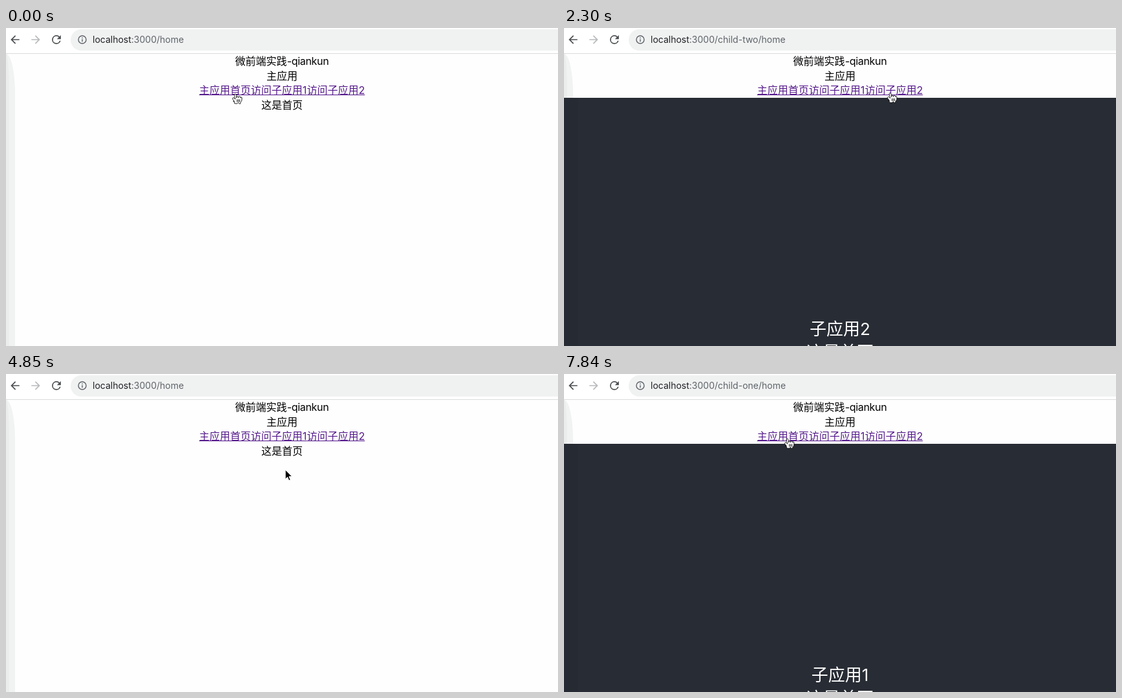
These frames come from a looping animation (854 px wide and 492 px high, 7.99 s). An HTML page:

```html
<!DOCTYPE html>
<html lang="zh-CN">
<head>
<meta charset="utf-8">
<style>
html, body { margin: 0; width: 100%; height: 100%; overflow: hidden; background: #fefefe; }
body { position: relative; font: 16px/22.5px Inter, "Noto Sans CJK SC", "Noto Sans CJK", sans-serif; color: #000; }
body > * { position: absolute; }
#edge { left: 0; top: 40px; width: 14px; height: 452px; overflow: hidden; background: #f1f2f2; border-top-right-radius: 14px 62px; }
#edge::before { content: ""; position: absolute; width: 5px; height: 100%; background: #ebecec; border-top-right-radius: 5px 60px; }
#bar { left: 0; top: 0; width: 100%; height: 39px; background: #fff; border-bottom: 1px solid #dadcdc; }
#pill { left: 100px; top: 2px; width: 780px; height: 33px; border-radius: 17px; background: #f0f2f2; }
#url { left: 134px; top: 7px; font-size: 14px; white-space: pre; color: #5f6368; }
#url b { font-weight: 400; color: #202124; }
#main { left: 0; top: 40px; width: 100%; text-align: center; }
#main span { letter-spacing: -.3px; }
a { color: #551a8b; text-decoration: underline 1px; text-underline-offset: 1px; }
a.active { color: #f00; }
#child { left: 0; top: 107.5px; width: 100%; height: 385px; background: linear-gradient(90deg, #262a32 22px, #282c34 22px); overflow: hidden; color: #fff; font-size: 26px; line-height: 36.4px; text-align: center; }
#child div { margin-top: 340.5px; }
svg { left: 0; top: 0; width: 854px; height: 492px; }
</style>
</head>
<body>
<div id="edge"></div>
<div id="bar"></div>
<div id="pill"></div>
<div id="url"><b>localhost</b>:3000<span id="path"></span></div>
<div id="main">
  <div>微前端实践<span>-qiankun</span></div>
  <div>主应用</div>
  <div><a>主应用首页</a><a>访问子应用1</a><a>访问子应用2</a></div>
  <div>这是首页</div>
</div>
<div id="child"><div id="name"></div>这是首页</div>
<svg viewBox="0 0 854 492">
  <defs><path id="back" d="M20 11H7.83l5.59-5.59L12 4l-8 8 8 8 1.41-1.41L7.83 13H20z"/></defs>
  <use href="#back" fill="#4d5053" transform="translate(14 18) scale(.84) translate(-12 -12)"/>
  <use href="#back" fill="#b9bbbd" transform="translate(46 18) scale(-.84 .84) translate(-12 -12)"/>
  <path fill="#4d5053" transform="translate(78 18) scale(.86) translate(-12 -12)" d="M17.65 6.35A7.96 7.96 0 0 0 12 4a8 8 0 1 0 7.73 10h-2.08A6 6 0 1 1 12 6c1.66 0 3.14.69 4.22 1.78L13 11h7V4z"/>
  <g fill="none" stroke="#5f6368" stroke-width="1.4">
    <circle cx="118" cy="18" r="6"/>
    <path d="M118 17.2v4M118 14.4v1.5"/>
  </g>
  <g id="cursor">
    <path id="arrow" d="M0 0V14.5L3.4 11.4 5.6 16.6 8 15.6 5.8 10.5H10.4Z" stroke="#fff"/>
    <g id="hand" transform="translate(-13 -8)" stroke="#000" stroke-width=".9" stroke-linejoin="round" stroke-linecap="round">
      <path fill="#fff" d="m11.3 20.4c-.3-.4-.6-1.1-1.2-2-.3-.5-1.2-1.5-1.5-1.9-.2-.4-.2-.6-.1-1 .1-.6.7-1.1 1.4-1.1.5 0 1 .4 1.4.7.2.2.5.6.7.8.2.2.2.3.4.5.2.3.3.5.2.1-.1-.5-.2-1.3-.4-2.1-.1-.6-.2-.7-.3-1.1-.1-.5-.2-.8-.3-1.3-.1-.3-.2-1.1-.3-1.5-.1-.5-.1-1.4.3-1.8.3-.3.9-.4 1.3-.2.5.3.8 1 .9 1.3.2.5.4 1.2.5 2 .2 1 .5 2.5.5 2.8 0-.4-.1-1.1 0-1.5.1-.3.3-.7.7-.8.3-.1.6-.1.9-.1.3.1.6.3.8.5.4.6.4 1.9.4 1.8.1-.4.1-1.2.3-1.6.1-.2.5-.4.7-.5.3-.1.7-.1 1 0 .2 0 .6.3.7.5.2.3.3 1.3.4 1.7 0 .1.1-.4.3-.7.4-.6 1.8-.8 1.9.6v2.7c0 .5-.1 1-.2 1.5-.1.4-.4 1.1-.7 1.5-.4.4-.8 1.1-1.1 1.6-.2.4-.2.6-.2 1v.8c-.3.1-1.2.1-1.7 0-.5-.1-1.1-1.1-1.3-1.4-.3-.5-.5-.4-.6-.2-.2.4-.8 1.3-1.3 1.4-.9.1-2.7 0-4.2 0 0 0 .2-1.4-.3-1.9-.3-.3-1-1-1.4-1.3z"/>
      <path fill="none" d="M19.6 20.7v-3.4M17.6 20.7v-3.4M15.6 17.3v3.4"/>
    </g>
  </g>
</svg>
<script>
const LOOP = 7990, STEP = 150, PRESS = 150;
const $ = id => document.getElementById(id);
const links = document.querySelectorAll("a");
const pages = ["/home", "/child-one/home", "/child-two/home"];

// Page loads: time, page index
const visits = [[0, 0], [800, 1], [2300, 2], [3950, 0], [5900, 1]];

// Pointer tip: time, x, y
const route = [
  [0, 355, 101.5], [500, 355, 101.5], [650, 421, 101.5], [800, 422, 101.5],
  [1250, 432, 150], [1550, 432, 150], [2150, 505, 100], [2300, 505, 100],
  [2600, 498, 143], [2750, 498, 150], [2900, 498, 150], [3800, 332, 100],
  [3950, 332, 100], [5000, 438, 151], [5750, 421, 100], [5900, 421, 99.5],
  [6800, 421, 99.5], [7850, 346, 99.5], [8000, 346, 99.5]
];

function pointer(t) {
  const i = route.findIndex(k => k[0] > t);
  const [t0, x0, y0] = route[i - 1], [t1, x1, y1] = route[i];
  const u = (t - t0) / (t1 - t0), e = u * u * (3 - 2 * u);
  return [x0 + (x1 - x0) * e, y0 + (y1 - y0) * e];
}

function captured(t) {
  if (t >= 7840) return 7850;
  return Math.max(0, 50 + Math.floor((t - 50) / STEP) * STEP);
}

function draw(now) {
  const t = captured(now % LOOP);
  const page = visits.filter(v => v[0] <= t).pop()[1];
  const next = visits.find(v => v[0] > t);
  const pressed = next && next[0] - t <= PRESS ? next[1] : -1;
  const [x, y] = pointer(t);
  const onLink = y < 107 && x > 299 && x < 556;

  $("path").textContent = pages[page];
  $("name").textContent = "子应用" + page;
  $("child").style.display = page ? "block" : "none";
  links.forEach((a, i) => a.className = i === pressed ? "active" : "");
  $("cursor").setAttribute("transform", `translate(${x} ${y})`);
  $("hand").style.display = onLink ? "" : "none";
  $("arrow").style.display = onLink ? "none" : "";
}

const start = performance.now();
function tick() {
  draw(performance.now() - start);
  requestAnimationFrame(tick);
}
tick();
</script>
</body>
</html>
```
